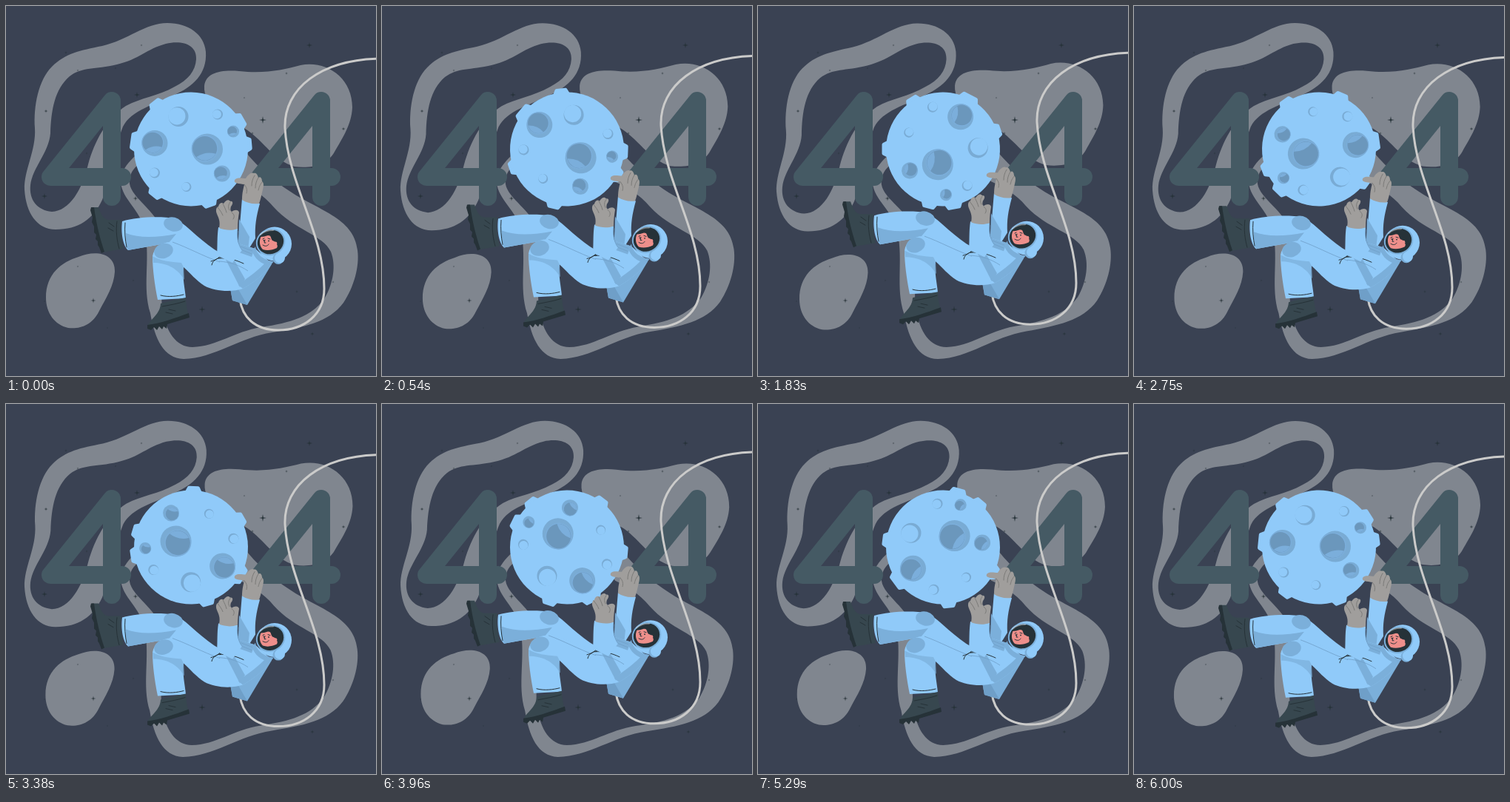
Write an HTML page that moves like this. It is 500x500 px and loops after 6.04 s.

```html
<!DOCTYPE html>
<html lang="en">
<head>
<meta charset="utf-8">
<title>404</title>
<style>
  html, body { margin: 0; width: 100%; height: 100%; overflow: hidden; background: #3a4253; }
  svg { display: block; width: 100vw; height: 100vh; }
  .suit { fill: #90caf9; }
  .shade { fill: #7bafda; }
  .boot { fill: #37474f; }
  .dark { fill: #263238; }
  .glove { fill: #a09e9c; }
  .skin { fill: #ee8f8b; }
  .line { fill: none; stroke: #263238; stroke-width: 1; stroke-linecap: round; }
  .seam { fill: none; stroke: #6f9fc8; stroke-width: .8; }
  .crease { fill: none; stroke: #777674; stroke-width: .9; stroke-linecap: round; }
</style>
</head>
<body>
<svg viewBox="0 0 500 500">
  <g id="cloud" fill="#80868f">
    <path fill-rule="evenodd" d="M270 62C268 38 246 23 218 23C188 23 165 46 130 54C100 60 80 64 62 82C44 100 37 135 39 165C41 195 24 222 25 248C27 280 42 302 67 302C98 302 118 288 130 262C142 232 146 192 158 163C170 140 200 134 228 120C252 109 272 92 270 62Z
      M257 72C258 52 238 46 216 51C190 58 180 72 150 79C120 86 103 82 86 95C66 112 61 140 60 172C58 198 36 218 33 242C31 262 42 276 62 278C86 277 103 248 111 214C120 182 136 152 162 135C182 124 205 122 228 109C246 100 256 88 257 72Z"/>
    <path d="M268 108C270 90 290 86 315 88C350 92 375 86 398 80C432 73 468 96 468 137C467 160 455 178 444 197C434 215 412 220 390 217C362 209 350 184 325 167C300 152 266 135 268 108Z"/>
    <path fill-rule="evenodd" d="M200 185C178 196 154 218 155 238C157 262 182 275 188 305C195 345 184 380 195 415C201 450 213 476 240 477C282 476 315 448 360 441C402 434 436 428 456 401C470 380 478 352 475 330C470 285 420 276 380 248C350 228 330 206 318 190Z
      M205 200C184 208 165 220 167 240C170 260 203 276 212 306C218 345 206 380 212 412C216 440 230 461 252 461C285 460 308 440 345 434C385 428 412 420 430 396C443 374 446 350 439 332C428 309 390 303 362 272C348 255 330 245 315 238L290 205Z"/>
    <path d="M54 394C54 362 75 346 98 339C121 329 148 334 147 359C146 378 135 395 126 412C117 431 100 437 84 435C66 431 54 415 54 394Z"/>
  </g>
  <g id="stars" class="dark"></g>
  <g fill="none" stroke="#455a64" stroke-width="24" stroke-linecap="round" stroke-linejoin="round">
    <path id="four" d="M143 258V128L60 231H157"/>
    <use href="#four" x="283"/>
  </g>
  <g id="moon"></g>
  <g id="floater">
    <path fill="none" stroke="#cbcbca" stroke-width="3" d="M510 71C425 71 375 112 377 165C381 240 430 308 430 382C430 418 402 438 368 438C336 438 319 420 316 396"/>

    <!-- far arm -->
    <path class="suit" d="M319 260L343 267C338 285 336 298 337 314L327 330L314 320Z"/>
    <path class="shade" d="M315 288L329 312L327 330L314 320Z"/>
    <path class="glove" d="M319 262C319 252 321 246 322 241C315 240 307 240 309 235C312 231 319 233 324 233C327 228 332 224 335 226C338 225 340 228 341 232C344 230 346 233 346 237C349 239 348 244 347 248C345 256 344 262 342 267C333 268 325 266 319 262Z"/>
    <path class="crease" d="M336 229C333 234 332 238 332 243M341 232C338 237 337 241 337 246M346 238C342 243 342 246 341 249M322 241C326 246 326 249 325 253"/>

    <!-- backpack -->
    <path class="shade" d="M339 340L359 349L326 404L306 398L303 381Z"/>
    <path fill="#6f9fc8" d="M306 398L303 381L314 383L326 404Z"/>

    <!-- rear leg -->
    <path class="suit" d="M157 291C176 285 207 284 229 287C248 299 266 321 290 334L283 352L235 328C225 318 222 320 204 323L165 330C158 324 155 306 157 291Z"/>
    <path class="shade" d="M162 307C180 314 204 313 230 308L220 320L165 330C162 323 161 316 162 307Z"/>
    <path class="line" d="M161 293C160 304 161 316 163 326"/>
    <ellipse class="shade" cx="226" cy="295" rx="13" ry="9.5" transform="rotate(14 226 295)"/>
    <path class="boot" d="M116 272L125 272C128 280 131 289 139 289L156 289C154 302 156 316 159 328L130 333C125 314 120 296 116 272Z"/>
    <path class="dark" d="M115 272L119 272C122 295 127 314 133 332L129 334L126 326L124 323L124 318L121 315L122 309L119 306L119 298L116 292L117 286L114 276Z"/>
    <path class="line" d="M150 291C148 304 150 317 153 328M139 293L146 298M138 300L145 304"/>

    <!-- torso and front leg -->
    <path class="suit" d="M198 338C200 326 211 318 226 319C248 322 265 331 285 338C298 334 305 326 314 321L337 328L359 348C348 364 334 374 320 382C306 387 282 386 268 378C257 371 249 361 240 353C238 367 242 382 243 395L205 397C201 377 198 356 198 338Z"/>
    <path class="shade" d="M198 338C207 344 223 346 237 347L240 353L241 370C231 353 215 347 199 347Z" opacity=".7"/>
    <ellipse class="shade" cx="213" cy="331" rx="13" ry="10" transform="rotate(-18 213 331)"/>
    <path class="shade" d="M294 337L302 332L323 369L316 380Z"/>
    <path class="shade" d="M314 377C329 365 342 357 353 344L359 348C348 364 334 374 320 382Z"/>
    <path class="seam" d="M225 319C247 327 264 337 289 346M288 345C303 346 315 350 327 358"/>
    <path class="line" d="M278 350C279 343 288 339 296 339M277 345C285 343 289 340 292 334M287 341C300 340 310 343 321 348M209 391C220 394 232 392 240 390"/>
    <path class="boot" d="M209 402C220 399 232 396 243 394C243 403 245 411 247 420L217 430L192 436C189 425 208 420 209 402Z"/>
    <path class="dark" d="M191 431C208 429 228 422 247 415L248 421L218 430L217 436L213 433L211 437L207 433L204 438L200 434L196 438L191 436Z"/>
    <path class="line" d="M211 406C222 404 233 402 242 399M220 410L229 412M216 414L225 416"/>

    <!-- chest panel and near arm -->
    <path class="shade" d="M314 321L336 328L332 339L315 333Z"/>
    <path class="seam" d="M317 325L333 331M317 329L332 335"/>
    <path class="suit" d="M287 299L313 301C312 312 313 323 319 330L306 347L285 337C286 323 285 312 287 299Z"/>
    <path class="seam" d="M313 304C312 315 314 323 319 330"/>
    <path class="glove" d="M288 300C290 291 287 286 285 281C283 276 284 272 287 271C288 266 292 265 294 267C297 262 301 261 303 264C306 263 308 266 304 271C303 275 303 276 305 278C309 275 314 275 315 279C314 285 313 292 313 301C304 304 296 303 288 300Z"/>
    <path class="crease" d="M286 272C289 276 291 278 293 283M293 267C295 271 297 275 298 279M303 265C300 269 300 272 302 276M305 279C309 282 309 285 307 288"/>

    <!-- helmet -->
    <path class="shade" d="M337 325C338 335 348 344 362 345L357 351C345 349 335 341 333 331Z"/>
    <circle class="suit" cx="363" cy="321.5" r="23"/>
    <ellipse class="shade" cx="357.5" cy="319" rx="20" ry="18" transform="rotate(-24 357.5 319)"/>
    <ellipse class="dark" cx="357.5" cy="319" rx="18" ry="16" transform="rotate(-24 357.5 319)"/>
    <path class="skin" d="M345 311C351 305 357 306 361 310C367 314 369 321 366 327C360 330 353 331 347 329C342 324 342 316 345 311Z"/>
    <path class="dark" d="M344 312C349 303 361 302 369 307C375 313 374 324 367 329C368 322 364 318 360 317C357 313 359 310 354 310C350 311 348 312 344 312Z"/>
    <circle class="skin" cx="364" cy="321" r="2.4"/>
    <path class="line" d="M347 315L349 314M354 314L357 315M350 316L349 320L351 320M347 323C350 325 353 325 355 322"/>
    <circle class="dark" cx="348.5" cy="317" r=".9"/>
    <circle class="dark" cx="355" cy="317.4" r=".9"/>
    <path fill="none" stroke="#fff" stroke-opacity=".35" stroke-width="2" stroke-linecap="round" d="M344 309C349 304 355 303 361 303"/>
    <circle class="shade" cx="368" cy="341.5" r="7.5"/>
    <circle class="suit" cx="370" cy="340.5" r="7"/>
  </g>
</svg>
<script>
const $ = id => document.getElementById(id);
const LOOP = 6040, MX = 250, MY = 193.5;
const LIGHT = '#90caf9', RIM = '#79abd4', PIT = '#6b97bc', MID = '#7baedb';

// Four-pointed sparkles: x, y, radius
$('stars').innerHTML = [
  [177, 120, 4], [410, 53, 4], [347, 154, 5], [52, 257, 4], [118, 398, 3.5], [265, 410, 4.5],
  [175, 260, 3.5], [81, 63, 2], [54, 142, 2.5], [183, 53, 1.5], [97, 87, 1.5], [456, 166, 2.5],
  [379, 91, 2], [333, 172, 2], [393, 386, 2], [414, 443, 2.5], [442, 373, 1.5], [97, 352, 1.2],
  [109, 199, 1.5], [172, 371, 1.2], [148, 84, 1.2], [137, 435, 1], [52, 399, 1], [322, 124, 1.2]
].map(([x, y, r]) => {
  const k = r * .16;
  return `<path d="M${x} ${y - r}L${x + k} ${y - k}L${x + r} ${y}L${x + k} ${y + k}L${x} ${y + r}L${x - k} ${y + k}L${x - r} ${y}L${x - k} ${y - k}Z"/>`;
}).join('');

const disc = (x, y, r, fill) => `<circle cx="${x}" cy="${y}" r="${r}" fill="${fill}"/>`;

// Rim crescent, with an optional two-tone pit
function crater([x, y, r, pit]) {
  let s = disc(x, y, r, RIM) + disc(x - r * .16, y - r * .05, r * .86, pit ? MID : LIGHT);
  if (pit) s += disc(x - r * .16, y - r * .05, r * .79, PIT) +
    `<path fill="${MID}" d="M${x - r * .7} ${y + r * .5}A${r * .79} ${r * .79} 0 0 0 ${x + r * .55} ${y + r * .3}Q${x - r * .1} ${y + r * .1} ${x - r * .7} ${y + r * .5}Z"/>`;
  return s;
}

// Raised edges: angle, half width
const bumps = [[-128, 8], [-172, 11], [129, 8], [71, 8], [-30, 9], [-5, 8]].map(([a, w]) =>
  `<path transform="rotate(${a})" d="M72 ${-w - 2}L80 ${2 - w}V${w - 2}L72 ${w + 2}Z" stroke="${LIGHT}" stroke-width="5" stroke-linejoin="round"/>`);

$('moon').innerHTML = `<g fill="${LIGHT}">${bumps.join('')}</g>` + disc(0, 0, 77, LIGHT) + [
  [22, 0, 21, 1], [-49, -8, 17.5, 1], [-17, -44, 13.5, 0], [36, -47, 7, 0],
  [57, -24, 8, 1], [42, 33, 11, 1], [-49, 32, 7, 0], [-6, 51, 6.5, 0]
].map(crater).join('');

// Triangle wave: 0, 1, 0, -1, 0
const wave = p => 1 - Math.abs(((p + .75) % 1) * 4 - 2);

function draw(now) {
  const p = now % LOOP / LOOP;
  const lift = 1 - Math.abs(1 - p * 2 % 1 * 2);
  $('moon').setAttribute('transform', `translate(${MX} ${MY}) rotate(${p * 360})`);
  $('floater').setAttribute('transform', `translate(0 ${-10 * lift})`);
  $('cloud').setAttribute('transform', `rotate(${-wave(p + .5)} 250 250)`);
  requestAnimationFrame(draw);
}
draw(performance.now());
</script>
</body>
</html>
```
